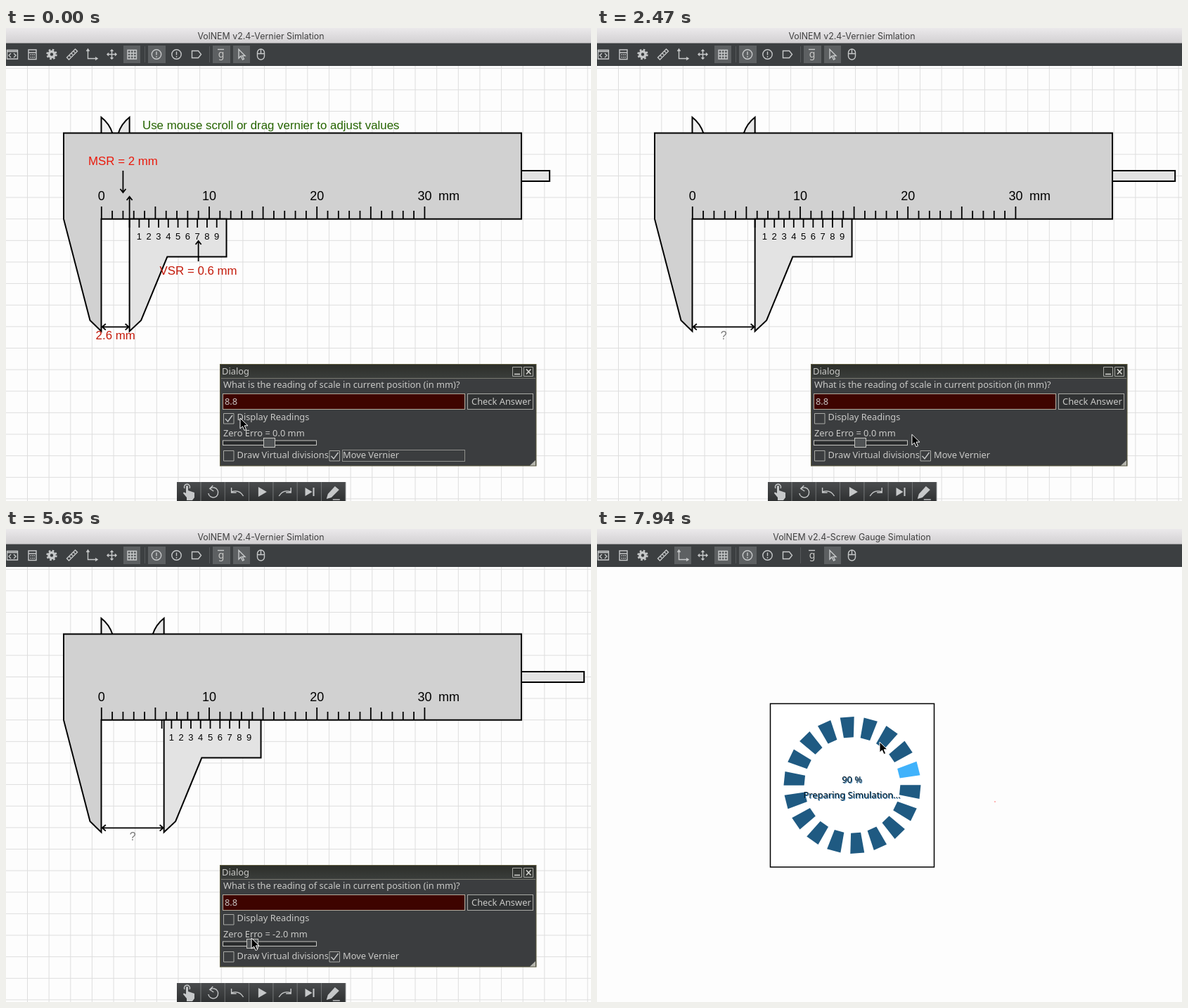
These frames come from a looping animation (832 by 673 pixels, 8 s). An HTML page:

```html
<!DOCTYPE html>
<html lang="en">
<head>
<meta charset="utf-8">
<title>Vernier</title>
<style>
html, body { margin: 0; width: 100%; height: 100%; overflow: hidden; background: #fdfdfd; }
svg { display: block; width: 100%; height: 100%; }
text { white-space: pre; }
.mid { text-anchor: middle; }
.arial { font-family: "Liberation Sans", Arial, sans-serif; }
.ui { font: 12.87px "Noto Sans", sans-serif; fill: #c9c9c7; }
.bar { font: 12.4px Inter, sans-serif; text-anchor: middle; }
.note { font-size: 16.87px; }
.ink { stroke: #000; stroke-width: 2; }
.line { fill: none; stroke: #000; stroke-width: 1.8; }
.icon { fill: none; stroke: #c6c8c9; stroke-width: 1.4; }
.solid { fill: #c6c8c9; }
.edge { fill: none; stroke: #a9aaa6; }
.dots { fill: none; stroke: #e4e4da; stroke-dasharray: 1 1; }
</style>
</head>
<body>
<svg viewBox="0 0 832 673" xmlns="http://www.w3.org/2000/svg">
<defs>
  <linearGradient id="chrome" x2="0" y2="1"><stop stop-color="#ebe9eb"/><stop offset="1" stop-color="#d2d0d2"/></linearGradient>
  <linearGradient id="cap" x2="0" y2="1"><stop stop-color="#2d2f2a"/><stop offset="1" stop-color="#3a3d3b"/></linearGradient>
  <linearGradient id="key" x2="0" y2="1"><stop stop-color="#4a4c4e"/><stop offset="1" stop-color="#2f3132"/></linearGradient>
  <filter id="shade" x="-30%" y="-60%" width="160%" height="240%"><feGaussianBlur stdDeviation="14"/></filter>
</defs>
<rect width="832" height="673" fill="#fdfdfd"/>
<g id="sim">
  <path id="grid" fill="none" stroke="#dedede"/>
  <path id="rod" class="ink" fill="#e3e3e3"/>
  <g class="ink">
    <path fill="#f0f0f0" d="M135.5 150V127Q147 136 151.5 150"/>
    <path id="jaw" fill="#e8e8e8"/>
    <path fill="#d1d1d1" d="M82 149.5H733V271.7H135.5V431.5L119.5 416L82 271.7Z"/>
  </g>
  <path id="scale" class="line"/>
  <g id="marks" class="arial mid" font-size="18"></g>
  <g id="slide">
    <path class="ink" fill="#e3e3e3" d="M0 271.7H137.9V325.5H53.7L16.5 416L0 431.5Z"/>
    <g id="ticks" class="arial mid" font-size="13"></g>
  </g>
  <path id="span" class="line"/>
  <text id="ask" class="arial mid" y="443" font-size="16" fill="#777">?</text>
  <g id="readings" class="arial note">
    <text x="194" y="144" fill="#256400">Use mouse scroll or drag vernier to adjust values</text>
    <path id="arrows" class="line"/>
    <g class="mid" fill="#c41a0a">
      <text id="msr" y="195" fill="#ea1a0c"></text>
      <text id="vsr" y="351"></text>
      <text id="sum" y="443"></text>
    </g>
  </g>
  <circle id="dot" cy="315.5" r="4" fill="#f27c78"/>
  <g class="ui">
    <rect x="304.5" y="478.5" width="449.5" height="144.5" fill="#3b3d3f" stroke="#5d5a3c"/>
    <rect x="305" y="479" width="448.5" height="19" fill="url(#cap)"/>
    <path stroke="#77786f" d="M306 498.5H753"/>
    <text x="307" y="493">Dialog</text>
    <path class="edge" d="M720.5 482.5h13v13h-13zM736.5 482.5h13v13h-13z"/>
    <path fill="none" stroke="#d8d8d4" stroke-width="1.6" d="M723 492.5H731M740 485.5L746.5 492.5M746.5 485.5L740 492.5"/>
    <text x="309" y="512">What is the reading of scale in current position (in mm)?</text>
    <rect x="308.5" y="520.5" width="344" height="22" fill="#3e0400" stroke="#b3aa9c"/>
    <text id="answer" x="311" y="536"></text>
    <path id="caret" stroke="#ddd" d="M310.5 523V540"/>
    <rect id="button" x="656.5" y="520.5" width="93" height="22" stroke="#a9aaa6"/>
    <text x="662" y="536">Check Answer</text>
    <path class="edge" d="M309.5 548.5h14.5v14.5h-14.5zM309.5 601.5h14.5v14.5h-14.5zM460 601.5h14.5v14.5h-14.5z"/>
    <path id="tickShow" class="icon" d="M312 556L315.5 560L322 551"/>
    <path id="tickMove" class="icon" d="M462.5 609L466 613L472.5 604"/>
    <text x="328.5" y="558">Display Readings</text>
    <text id="zero" x="309" y="581"></text>
    <rect x="308.5" y="587" width="133" height="6.5" fill="#2a2c2d" stroke="#c4c4c0"/>
    <rect id="knob" y="583.5" width="16" height="13" fill="#505355" stroke="#c4c4c0"/>
    <text x="328.5" y="612">Draw Virtual divisions</text>
    <text x="479" y="612">Move Vernier</text>
    <path fill="#b5b5ad" d="M753 615V622.5H745Z"/>
    <path id="focus" class="dots"/>
  </g>
  <g id="player"></g>
  <g id="keys"></g>
  <g id="message">
    <rect x="209" y="305" width="307" height="112" rx="6" filter="url(#shade)" opacity=".6"/>
    <rect x="209" y="292" width="307" height="111" rx="5" fill="#3c3f41"/>
    <path fill="url(#chrome)" d="M209 315V297q0-5 5-5H511q5 0 5 5V315Z"/>
    <circle cx="223" cy="304" r="6" fill="#f2564f"/>
    <g fill="#d0d0d0" stroke="#bdbdbd"><circle cx="242.5" cy="304" r="5.5"/><circle cx="262" cy="304" r="5.5"/></g>
    <text class="bar" x="362" y="308" fill="#333">Correct Answer!</text>
    <circle cx="236.5" cy="342" r="14" fill="#3b78b5"/>
    <path fill="#d9dee3" d="M234.5 333h4v4h-4zM233 339h5.5v10h1.5v2h-7v-2h1.5v-8h-1.5z"/>
    <text class="ui" x="268" y="345" style="font-size:12.5px;letter-spacing:.3px">Congratulation! your answer is correct</text>
    <rect x="433.5" y="369.5" width="70" height="21" fill="#365880" stroke="#4f7fb0"/>
    <text class="ui mid" x="468" y="385" style="font-weight:700;font-size:12px">OK</text>
  </g>
</g>
<g id="loader">
  <rect x="246.5" y="248.5" width="233" height="232.5" fill="#fff" stroke="#000" stroke-width="1.5"/>
  <g id="ring"></g>
  <g id="loadText" class="ui mid"></g>
  <circle cx="566" cy="388" r=".8" fill="#f55"/>
</g>
<rect id="titleBar" width="832" height="21.5"/>
<text id="title" class="bar" x="362.5" y="15.5"></text>
<rect y="21.5" width="832" height="32.5" fill="#3c3f41"/>
<g fill="#5d6062">
  <path d="M167 25h24v25h-24zM202 25h25v25h-25zM323 25h24v25h-24z"/>
  <path id="onAxes" d="M110 25h24v25h-24z"/>
  <path id="onG" d="M294 25h25v25h-25z"/>
</g>
<path stroke="#55585a" d="M197.5 26V49M289.5 26V49"/>
<g class="icon">
  <path d="M1.5 31.5H16.5V44H1.5ZM1.5 33.5H16.5M7 36L4 39L7 42M11 36L14 39L11 42"/>
  <path d="M32 31H43V44.5H32ZM32 35H43M34.5 38h1.5m1 0h1.5m1 0h1.5M34.5 41.5h1.5m1 0h1.5m1 0h1.5"/>
  <circle cx="65" cy="37.5" r="4" stroke-width="3.6"/>
  <circle cx="65" cy="37.5" r="6.5" stroke-width="2.4" stroke-dasharray="2.6 2.5"/>
  <path d="M86.5 42L98.5 30L101.5 33L89.5 45ZM90 39l2 2M93 36l2 2M96 33l2 2"/>
  <path d="M116.5 30V43.5H130M114.5 33L116.5 30L118.5 33M127 41.5L130 43.5L127 45.5"/>
  <path d="M150.5 31V44M144 37.5H157M148.5 33l2-2 2 2M148.5 42l2 2 2-2M146 35.5l-2 2 2 2M155 35.5l2 2-2 2"/>
  <path d="M173 31.5H185.5V44H173ZM177.2 31.5V44M181.3 31.5V44M173 35.7H185.5M173 39.8H185.5"/>
  <g id="alerts"></g>
  <path d="M264.5 32.5H273.5L277.5 37.5L273.5 42.5H264.5Z"/>
  <path d="M331 30.5V43L334 40L336.5 45L338.5 44L336 39.5H340Z"/>
  <path d="M357.5 35a5 5 0 0 1 10 0v5a5 5 0 0 1-10 0ZM357.5 36.5h10M362.5 30v6.5"/>
  <path d="M301 30.5H310"/>
</g>
<text class="ui mid" x="306" y="42" style="font-size:14px">g</text>
<circle id="click" r="10.3" fill="#e31b17" opacity=".95"/>
<path id="cursor" stroke="#fff" d="M0 0V15L3.5 11.8L6 17.5L8.6 16.4L6.2 10.8H11Z"/>
</svg>
<script>
const $ = id => document.getElementById(id);
const LOOP = 8000, FPS = 17, CUT = 7640;
const MM = 15.32, ZERO = 135.8, BASE = 271.7;
const APP = 'VolNEM v2.4';

const times = (n, f) => Array.from({ length: n }, (_, i) => f(i)).join('');
const set = (id, attrs) => { for (const k in attrs) $(id).setAttribute(k, attrs[k]); };
const show = (id, on) => set(id, { visibility: on ? 'inherit' : 'hidden' });
const write = (id, s, x = $(id).getAttribute('x')) => { $(id).textContent = s; set(id, { x }); };
const within = (t, a, b) => t >= a && t < b;
const ramp = (t, a, b) => Math.min(1, Math.max(0, (t - a) / (b - a)));
const ease = (t, a, b) => { const u = ramp(t, a, b); return u * u * (3 - 2 * u); };
const mix = (a, b, u) => a + (b - a) * u;

// Opening of the jaws in mm, their left edge, and the zero error set by the slider.
const gap = t => 2.6 + 3.5 * ramp(t, 1200, 1760) - 0.3 * ease(t, 1760, 1920);
const edge = t => ZERO + gap(t) * MM;
const error = t => -2 * ease(t, 5200, 5500);

// Places the pointer visits; a box is the focus outline gained by a press.
const spots = {
  show: { at: () => [333, 555], box: 'M328.5 546.5h422v16h-422z' },
  move: { at: () => [463, 606], box: 'M478.5 600.5h174v16h-174z' },
  field: { at: () => [441, 538], box: 'M309.5 521.5h342v20h-342z' },
  check: { at: () => [674, 524], box: 'M657.5 521.5h91v20h-91z' },
  grip: { at: t => [edge(t) + 79, 314] },
  stuck: { at: () => [290, 308] },
  label: { at: () => [400, 547] },
  knob: { at: t => [376 + error(t) * 12, 587] },
  ok: { at: () => [464, 380] },
  rest: { at: () => [402, 303] }
};
const visit = (spot, from, to, press = Infinity) => ({ spot, from, to, press });
const visits = [
  visit('show', 0, 500, 170),
  visit('grip', 1130, 1920, 1180),
  visit('move', 2600, 3090, 2930),
  visit('stuck', 3350, 3650, 3420),
  visit('move', 4240, 4560, 4350),
  visit('label', 4880, 4930),
  visit('knob', 5130, 5600, 5150),
  visit('show', 5790, 5900, 5850),
  visit('field', 6050, 6590, 6050),
  visit('check', 6880, 7110, 7000),
  visit('ok', 7400, 7580, 7500),
  visit('rest', 7940, LOOP)
];
const pressed = t => visits.filter(v => v.press <= t);
const presses = (spot, t) => pressed(t).filter(v => v.spot === spot).length;

function pointer(t) {
  const i = visits.filter(v => v.from <= t).length - 1, a = visits[i], b = visits[i + 1];
  const start = spots[a.spot].at(Math.min(t, a.to));
  if (t <= a.to || !b) return start;
  const end = spots[b.spot].at(b.from), u = ease(t, a.to, b.from);
  return start.map((v, k) => mix(v, end[k], u));
}

function build() {
  set('grid', { d: times(27, i => `M${30.5 + i * 30.64} 54V673`) + times(21, i => `M0 ${57.3 + i * 30.63}H832`) });
  set('scale', { d: times(31, i => `M${ZERO + i * MM} ${BASE}V${i % 5 ? 260 : 254}`) });
  $('marks').innerHTML = times(4, i => `<text x="${ZERO + i * 10 * MM}" y="245">${i * 10}</text>`)
    + '<text x="630" y="245">mm</text>';
  const step = 0.9 * MM;
  $('ticks').innerHTML = `<path class="line" d="${times(10, i => `M${i * step} ${BASE}V284`)}"/>`
    + times(9, i => `<text x="${(i + 1) * step}" y="301">${i + 1}</text>`);
  $('alerts').innerHTML = times(2, i =>
    `<g transform="translate(${214 + i * 28.5} 37.5)"><circle r="6.7"/><path d="M0-4V1M0 2.5V4.2"/></g>`);
  const solid = d => `<path class="solid" d="${d}"/>`, line = d => `<path class="icon" d="${d}"/>`;
  const icons = [
    solid('M14 26V22L9 16q0-3 4 0V6q1.500-2 3 0v6l9 3v7l-3 4Z') + line('M11 9a4 4 0 1 1 7 0'),
    line('M13 9.5A7 7 0 1 1 10.5 16M17 5L12.5 9.5L18 13'),
    line('M26 20Q20 10 9 14M9 8V15H16'),
    solid('M13 7L25 14L13 21Z'),
    line('M8 20Q14 10 25 14M25 8V15H18'),
    solid('M11 8L21 14L11 20ZM22 8H24V20H22Z'),
    solid('M7 24L9 17L19 6L25 11L14 22Z') + line('M16 25H26')
  ];
  $('player').innerHTML = icons.map((s, i) => `<g transform="translate(${243 + i * 34.3} 646)">
    <rect width="34.3" height="27" fill="url(#key)"/><path stroke="#777a7b" d="M34 0V27"/>${s}</g>`).join('');
}

// Pill that lists n presses of one key.
const pill = (y, w, n, glyph) => `<g transform="translate(416 ${y})" fill="none" stroke="#f4f4f4" stroke-width="1.2">
  <rect x="${-w / 2}" y="-13" width="${w}" height="26" rx="13" fill="#141414" fill-opacity=".65" stroke="none"/>
  ${times(n, i => `<path transform="translate(${(i - (n - 1) / 2) * 14})" d="${glyph}"/>`)}</g>`;

function drawKeys(t) {
  const arrows = Math.min(3, 1 + Math.floor((t - 6050) / 58));
  $('keys').innerHTML =
    (within(t, 6050, 6850) ? pill(t < 6225 ? 640 : 606, 62, arrows, 'M5 0h-10m4-4l-4 4l4 4') : '')
    + (within(t, 6225, 7350) ? pill(640, 51, t < 6270 ? 1 : 2, 'M-6 0l4-4.5h8v9h-8zm5-2l4 4m0-4l-4 4') : '');
  write('answer', t < 6225 ? '8.8' : t < 6270 ? '.8' : '5.8');
}

function drawCaliper(t) {
  const d = gap(t), vx = edge(t), mid = (ZERO + vx) / 2;
  const err = Math.round(error(t) * 10) / 10, off = err / 10;
  set('rod', { d: `M733 203H${vx + 597.5}V218H733Z` });
  set('jaw', { d: `M${vx} 150V127Q${vx - 11.5} 136 ${vx - 16} 150` });
  set('slide', { transform: `translate(${vx})` });
  set('ticks', { transform: `translate(${off * MM})` });
  set('span', { d: `M${ZERO + 2} 425.3H${vx - 2}M${ZERO + 6} 421l-5 4.3l5 4.3M${vx - 6} 421l5 4.3l-5 4.3` });
  set('ask', { x: mid });
  set('knob', { x: 366.5 + err * 12 });
  write('zero', `Zero Erro = ${err.toFixed(1)} mm`);

  const raw = d + off, main = Math.floor(raw + 1e-6);
  const mainX = ZERO + main * MM, matchX = vx + 98;
  write('msr', `MSR = ${main} mm`, mainX);
  write('vsr', `VSR = ${(raw - main).toFixed(1)} mm`, matchX);
  write('sum', (off ? `${raw.toFixed(1)}-(${off.toFixed(1)}) = ` : '') + `${d.toFixed(1)} mm`, mid);
  const up = (x, a, b) => `M${x} ${a}V${b}M${x - 4} ${b + 5}l4-5l4 5`;
  set('arrows', { d: `M${mainX} 203V234m-4-5l4 5l4-5` + up(ZERO + raw * MM, BASE, 240) + up(matchX, 332, 303) });
}

function drawState(t) {
  const shown = presses('show', t) % 2 === 0, last = pressed(t).pop() || visit('move');
  show('readings', shown);
  show('tickShow', shown);
  show('ask', !shown);
  show('tickMove', presses('move', t) % 2 === 0);
  show('dot', last.spot === 'grip' && t < last.to);
  set('dot', { cx: edge(t) - 4 });
  show('caret', last.spot === 'field');
  set('focus', { d: spots[last.spot].box || '' });
  set('button', { fill: last.spot === 'check' ? '#25261c' : '#303233' });
}

function drawLoader(t) {
  const k = Math.max(0, Math.round((t - CUT) * FPS / 1000)), lit = (k + 17) % 18;
  $('ring').innerHTML = times(18, i => `<path fill="${i === lit ? '#40b2fb' : '#1f5a82'}"
    transform="translate(363 364.5) rotate(${i * 20 - 4.3})" d="M-10-97H10L7-68H-7Z"/>`);
  const pair = (s, y) => `<text x="363.5" y="${y + 1}" fill="#2a78b0">${s}</text><text x="362.5" y="${y}" fill="#0c1c28">${s}</text>`;
  $('loadText').innerHTML = pair(Math.min(90, 15 + k * 15) + ' %', 361) + pair('Preparing Simulation...', 383);
}

function draw(t) {
  const loading = t >= CUT, modal = presses('check', t) > presses('ok', t);
  show('sim', !loading);
  show('loader', loading);
  show('onAxes', loading);
  show('onG', !loading);
  show('message', modal);
  write('title', APP + (loading ? '-Screw Gauge Simulation' : '-Vernier Simlation'));
  set('title', { fill: modal ? '#a3a3a3' : '#404040' });
  set('titleBar', { fill: modal ? '#f6f6f6' : 'url(#chrome)' });
  if (loading) drawLoader(t);
  else {
    drawCaliper(t);
    drawState(t);
    drawKeys(t);
  }
  const [x, y] = pointer(t);
  set('cursor', { transform: `translate(${x} ${y})` });
  show('click', visits.some(v => within(t, v.press - 60, v.press + 110)));
  set('click', { cx: x + 1, cy: y + 1 });
}

function tick(now) {
  const step = Math.floor((now % LOOP) * FPS / 1000 + 0.1);
  draw(step * 1000 / FPS);
  requestAnimationFrame(tick);
}
build();
tick(0);
</script>
</body>
</html>
```
